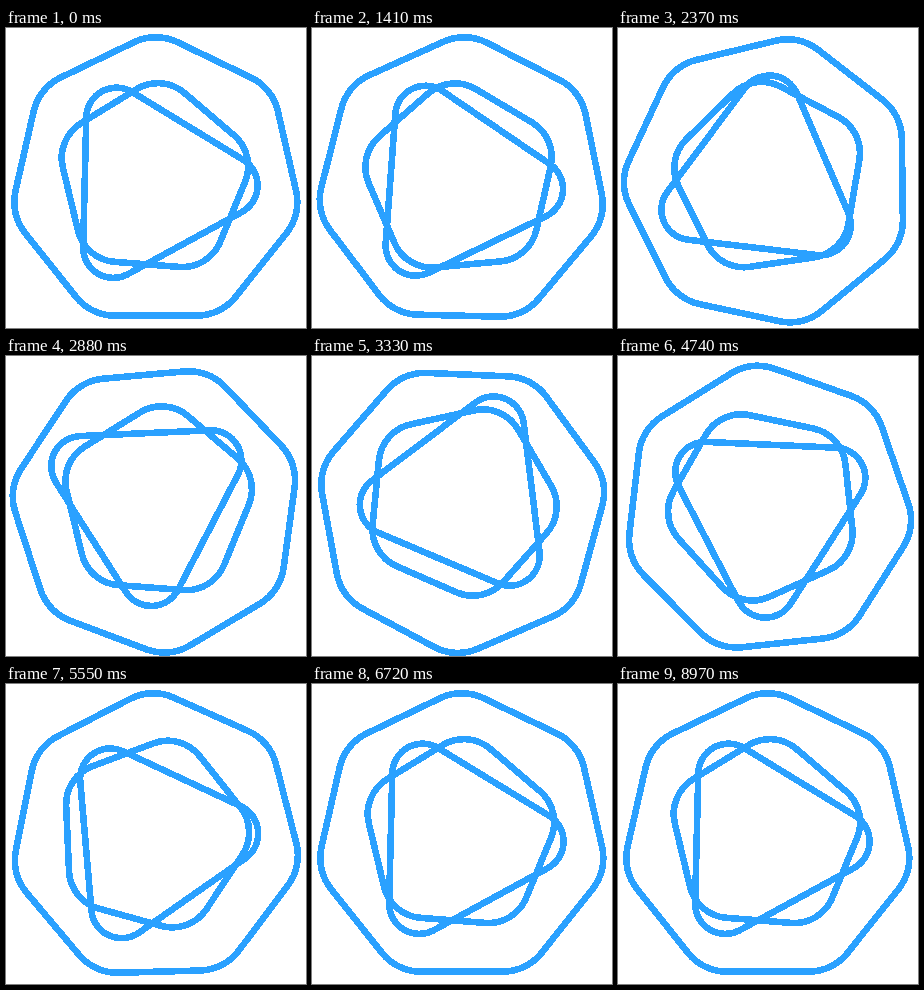
Write an HTML page that moves like this. It is 300x300 px and loops after 9 s.

```html
<!DOCTYPE html>
<html lang="en">
<head>
<meta charset="utf-8">
<title>Turning polygons</title>
<style>
  html, body { margin: 0; width: 100%; height: 100%; overflow: hidden; background: #fff; }
  svg { display: block; width: 100%; height: 100%; }
  path { fill: none; stroke: #2aa1ff; stroke-width: 6.6; shape-rendering: crispEdges; }
</style>
</head>
<body>
<svg viewBox="0 0 300 300"></svg>
<script>
const LOOP = 9000, START = 916, SPAN = 5530;
const svg = document.querySelector('svg');

// pivot: centre of rotation, at: centre of the polygon at rest,
// tilt: direction of its first corner, turn: degrees per loop
const shapes = [
  { sides: 7, radius: 94, corner: 49.9, pivot: [149.8, 153.1], at: [149.8, 153.1],
    tilt: -90, turn: 360 / 7, ease: [0.32, 0.44] },
  { sides: 5, radius: 55.3, corner: 40.8, pivot: [148.7, 148.1], at: [147.6, 151.1],
    tilt: -85.5, turn: -360, ease: [0.32, 0.44] },
  { sides: 3, radius: 75, corner: 30.2, pivot: [150, 147.9], at: [146.4, 155.7],
    tilt: 1.4, turn: 360, ease: [0.622, 0.228] }
];

function roundedPolygon(n, radius, corner) {
  let d = '';
  for (let k = 0; k < n; k++) {
    const mid = 2 * Math.PI * k / n;
    const point = side => {
      const a = mid + side * Math.PI / n;
      return [radius * Math.cos(mid) + corner * Math.cos(a),
              radius * Math.sin(mid) + corner * Math.sin(a)].map(v => v.toFixed(3)).join(' ');
    };
    d += `${k ? 'L' : 'M'}${point(-1)}A${corner} ${corner} 0 0 1 ${point(1)}`;
  }
  return d + 'Z';
}

// cubic-bezier(a, 0, b, 1)
function bezier(x, a, b) {
  if (x <= 0) return 0;
  if (x >= 1) return 1;
  let lo = 0, hi = 1, s = 0.5;
  for (let i = 0; i < 30; i++) {
    s = (lo + hi) / 2;
    const u = 1 - s;
    if (3 * a * s * u * u + 3 * b * s * s * u + s * s * s < x) lo = s;
    else hi = s;
  }
  return s * s * (3 - 2 * s);
}

for (const s of shapes) {
  s.path = document.createElementNS('http://www.w3.org/2000/svg', 'path');
  s.path.setAttribute('d', roundedPolygon(s.sides, s.radius, s.corner));
  svg.append(s.path);
}

function draw(time) {
  const x = (time % LOOP - START) / SPAN;
  for (const s of shapes) {
    const angle = s.turn * bezier(x, ...s.ease);
    s.path.setAttribute('transform',
      `rotate(${angle} ${s.pivot.join(' ')}) translate(${s.at.join(' ')}) rotate(${s.tilt})`);
  }
}

const origin = performance.now();
function tick() {
  draw(performance.now() - origin);
  requestAnimationFrame(tick);
}
tick();
</script>
</body>
</html>
```
